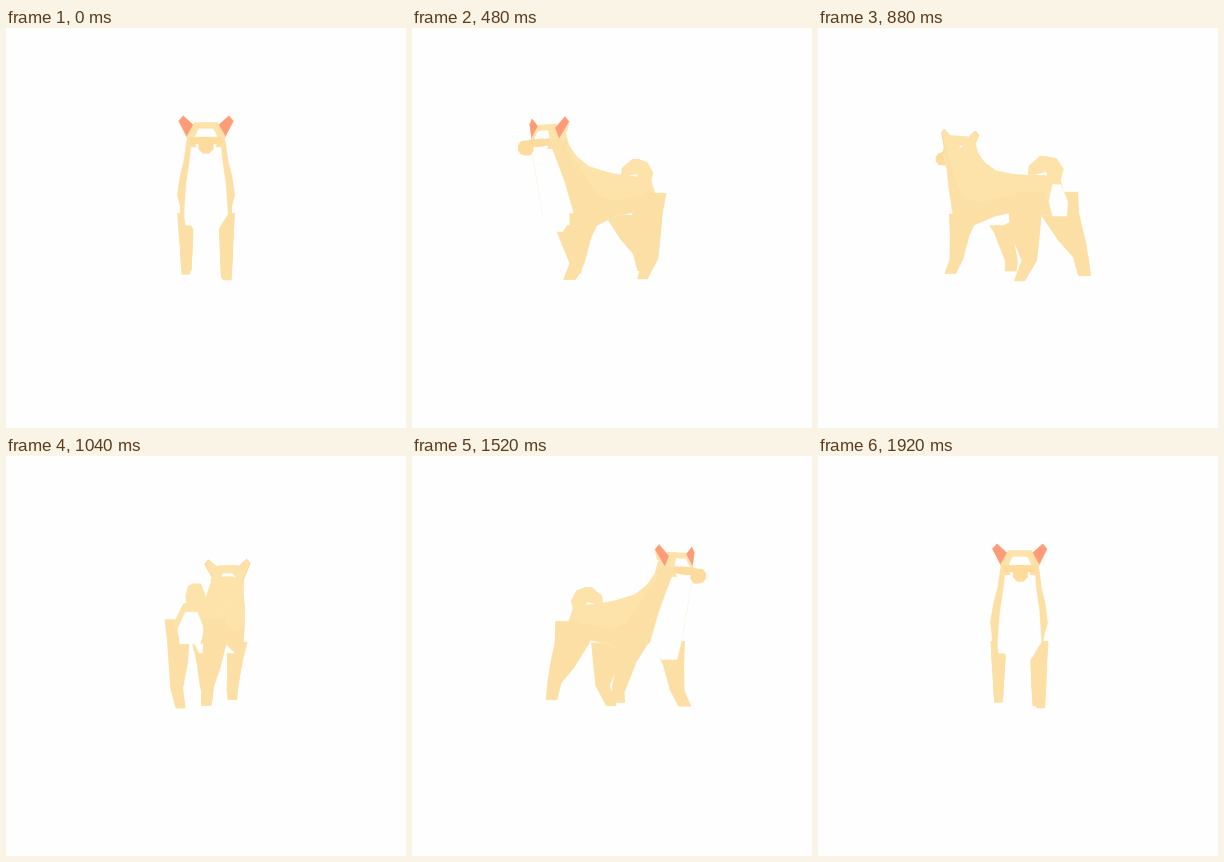
An HTML page with a canvas that plays this animation: 400 by 400 pixels, repeating every 2 s.

```html
<!DOCTYPE html>
<html lang="en">
<head>
<meta charset="utf-8">
<title>Turning dog</title>
<style>
  html, body { margin: 0; width: 100%; height: 100%; overflow: hidden; background: #fefefe; }
  canvas { display: block; width: 100vw; height: 100vh; }
</style>
</head>
<body>
<canvas id="stage" width="400" height="400"></canvas>
<script>
const LOOP = 2000, STEP = 80, EASE = 2.05;
const AXIS = 200, HORIZON = 194, DISTANCE = 1150;
const WHITE = '#fefefe', CREAM = '#fde3a9', SHADE = '#fbdfa4', FACE = '#fddb9c', ORANGE = '#ff9b78';

// Model space: x to the dog's left, y down the stage, z towards its nose.
const faces = [];
const addFace = (color, ...points) => faces.push({ color, points });

// Joins neighbouring rings with quads, one colour per side.
function skin(rings, colors) {
  for (let i = 1; i < rings.length; i++) {
    const a = rings[i - 1], b = rings[i];
    a.forEach((point, k) => {
      const next = (k + 1) % a.length;
      addFace(colors[k % colors.length], point, a[next], b[next], b[k]);
    });
  }
}

// Stations: top z, top y, bottom z, bottom y, half width. The last ring is a white cap.
function trunk(stations, topRatio) {
  const rings = stations.map(([tz, ty, bz, by, w]) => {
    const sy = ty + (by - ty) * 0.55, sz = tz + (bz - tz) * 0.55;
    const top = w * topRatio, low = w * 0.75;
    return [[-top, ty, tz], [top, ty, tz], [w, sy, sz], [low, by, bz], [-low, by, bz], [-w, sy, sz]];
  });
  skin(rings, [CREAM, CREAM, SHADE, WHITE, SHADE, CREAM]);
  addFace(WHITE, ...rings.at(-1));
}

// Stations: y, front z, back z. The leg narrows evenly towards the foot.
function leg(side, stations) {
  const rings = stations.map(([y, front, back], i) => {
    const half = 7 - 3.5 * i / (stations.length - 1);
    const inner = side * (19.5 - half), outer = side * (19.5 + half);
    return [[inner, y, front], [outer, y, front], [outer, y, back], [inner, y, back]];
  });
  skin(rings, [SHADE]);
}

// A flat side outline of z, y pairs, given a thickness.
function slab(half, color, outline) {
  const rings = [-half, half].map(x => outline.map(([z, y]) => [x, y, z]));
  skin(rings, [color]);
  rings.forEach(ring => addFace(color, ...ring));
}

function ear(side) {
  const rim = [[25, 101, 92], [21, 96.5, 93], [10, 106.5, 94], [17.5, 116, 97]]
    .map(([x, y, z]) => [side * x, y, z]);
  const back = [side * 15, 109, 84];
  addFace(ORANGE, ...rim);
  rim.forEach((point, i) => addFace(CREAM, point, rim[(i + 1) % rim.length], back));
}

function nose() {
  const ring = (r, z) => Array.from({ length: 8 }, (_, i) => {
    const a = (i + 0.5) * Math.PI / 4;
    return [r * Math.cos(a), 126 + r * Math.sin(a), z];
  });
  const rings = [ring(7, 120), ring(6, 127)];
  skin(rings, [FACE]);
  addFace(FACE, ...rings[1]);
}

trunk([
  [79, 116, 104, 122, 17.5],
  [63, 132, 96, 139, 20],
  [47, 141, 89, 158, 24],
  [25, 145, 79, 187, 27],
  [8, 147, 45, 197, 26],
  [-15, 148, 15, 188, 23],
  [-36, 149, -14, 184, 23],
  [-50, 150, -42, 186, 21],
  [-56, 158, -60, 188, 13]
], 0.45);
addFace(WHITE, [-20, 187, 79], [20, 187, 79], [10, 203, 84], [-10, 203, 84]);

trunk([
  [78, 112, 84, 128, 15],
  [86, 105, 92, 128, 17],
  [95, 103, 100, 126, 17.5],
  [100, 109, 103, 126, 11]
], 0.6);
addFace(FACE, [-14, 117, 104], [14, 117, 104], [14, 123, 104], [-14, 123, 104]);
slab(3, FACE, [[102, 117], [121, 120], [121, 125], [102, 123]]);
nose();
ear(1);
ear(-1);

slab(4, CREAM, [[-56, 156], [-61, 143], [-52, 133], [-37, 130], [-21, 139], [-20, 147], [-45, 143], [-49, 151]]);

leg(1, [[186, 77, 46], [208, 77, 61], [233, 79, 70], [247.5, 89, 80]]);
leg(-1, [[186, 70, 36], [205, 52, 37], [217, 46, 34], [235, 36, 28], [244.5, 38, 29]]);
leg(1, [[165, -28, -54], [185, -16, -49], [206, -18, -47], [231, -33, -44], [251, -21, -28]]);
leg(-1, [[165, -30, -58], [185, -18, -60], [212, -44, -70], [228, -64, -75], [245.5, -70, -79]]);

const ctx = document.getElementById('stage').getContext('2d');
ctx.lineWidth = 0.6;
ctx.lineJoin = 'round';

// One full turn, eased in and out.
function turn(t) {
  const half = u => (2 * u) ** EASE / 2;
  return 2 * Math.PI * (t < 0.5 ? half(t) : 1 - half(1 - t));
}

function project([x, y, z], sin, cos) {
  const depth = x * sin + z * cos;
  const scale = DISTANCE / (DISTANCE - depth);
  return {
    x: AXIS + (x * cos - z * sin) * scale,
    y: HORIZON + (y - HORIZON) * scale,
    depth
  };
}

function draw(now) {
  let ms = Math.floor((now % LOOP) / STEP) * STEP;
  if (ms === STEP) ms = 0; // the front view rests for two steps
  const angle = turn(ms / LOOP);
  const sin = Math.sin(angle), cos = Math.cos(angle);

  const visible = faces.map(({ color, points }) => {
    const spots = points.map(point => project(point, sin, cos));
    const depth = spots.reduce((sum, spot) => sum + spot.depth, 0) / spots.length;
    return { color, spots, depth };
  }).sort((a, b) => a.depth - b.depth);

  ctx.fillStyle = WHITE;
  ctx.fillRect(0, 0, 400, 400);
  for (const { color, spots } of visible) {
    ctx.beginPath();
    for (const { x, y } of spots) ctx.lineTo(x, y);
    ctx.closePath();
    ctx.fillStyle = ctx.strokeStyle = color;
    ctx.fill();
    ctx.stroke();
  }
}

const start = performance.now();
function tick() {
  draw(performance.now() - start);
  requestAnimationFrame(tick);
}
tick();
</script>
</body>
</html>
```
